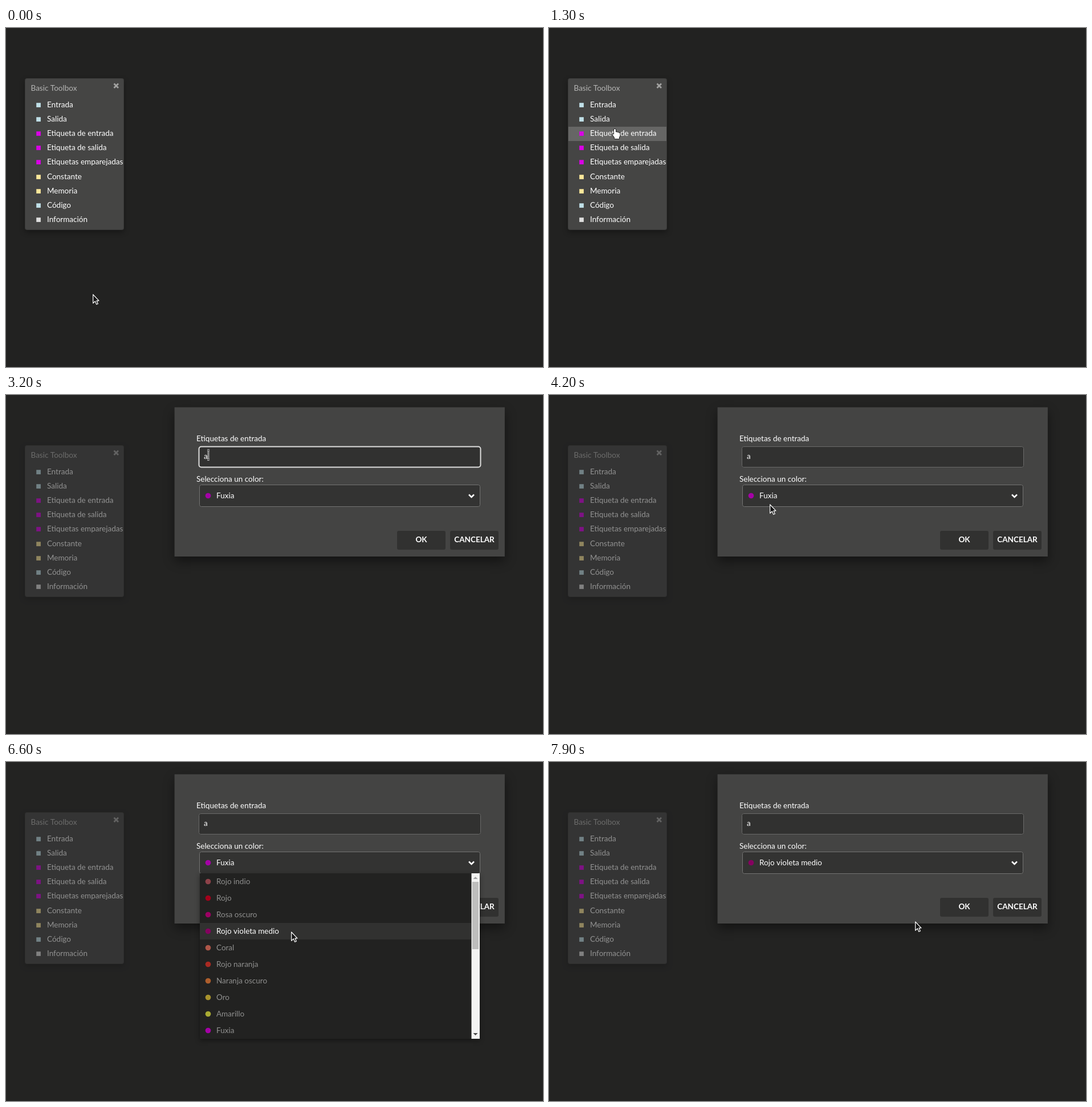
Write an HTML page with a canvas that moves like this. It is 942 by 594 pixels and loops after 8000 ms.

```html
<!DOCTYPE html>
<html lang="es">
<head>
<meta charset="utf-8">
<style>
  html, body { margin: 0; width: 100%; height: 100%; overflow: hidden; background: #222221; }
  canvas { display: block; }
</style>
</head>
<body>
<canvas id="stage" width="942" height="594"></canvas>
<script>
const ctx = document.getElementById('stage').getContext('2d');
const LOOP = 8000, STEP = 100;
const ZOOM = 0.9655; // the interface is laid out at 14px and shown slightly reduced

const BLUE = '#c0e0e8', FUCHSIA = '#da00e6', YELLOW = '#fce79a';
const TOOLS = [
  ['Entrada', BLUE], ['Salida', BLUE],
  ['Etiqueta de entrada', FUCHSIA], ['Etiqueta de salida', FUCHSIA], ['Etiquetas emparejadas', FUCHSIA],
  ['Constante', YELLOW], ['Memoria', YELLOW], ['Código', BLUE], ['Información', '#dddddd'],
];
const COLORS = [
  ['Rojo indio', '#8d4249'], ['Rojo', '#a3001b'], ['Rosa oscuro', '#9c0063'],
  ['Rojo violeta medio', '#850060'], ['Coral', '#ae5648'], ['Rojo naranja', '#a92a22'],
  ['Naranja oscuro', '#ad5e2c'], ['Oro', '#a8932c'], ['Amarillo', '#a9ab33'], ['Fuxia', '#a400a6'],
];

// Pointer path: time, x, y
const PATH = [
  [500, 152, 466], [800, 118, 247], [900, 118, 247], [1300, 116, 177],
  [1900, 116, 177], [2400, 355, 105], [3400, 355, 105], [3900, 393, 162],
  [4000, 393, 162], [4200, 387, 191], [4500, 389, 189], [5000, 389, 189],
  [5100, 401, 217], [5600, 433, 279], [5700, 433, 279], [5800, 417, 295],
  [6000, 417, 295], [6600, 500, 297], [7700, 500, 297], [7900, 642, 279],
];

const ramp = (t, a, b) => Math.min(1, Math.max(0, (t - a) / (b - a)));
const inside = (p, x, y, w, h) => p.x >= x && p.x < x + w && p.y >= y && p.y < y + h;

function pointerAt(t) {
  const i = PATH.findIndex(k => k[0] > t);
  if (i === 0) return { x: PATH[0][1], y: PATH[0][2] };
  if (i < 0) return { x: PATH.at(-1)[1], y: PATH.at(-1)[2] };
  const [t0, x0, y0] = PATH[i - 1], [t1, x1, y1] = PATH[i];
  const u = ramp(t, t0, t1), e = u * u * (3 - 2 * u);
  return { x: Math.round(x0 + (x1 - x0) * e), y: Math.round(y0 + (y1 - y0) * e) };
}

function rect(x, y, w, h, fill, radius = 0) {
  ctx.fillStyle = fill;
  ctx.beginPath();
  ctx.roundRect(x, y, w, h, radius);
  ctx.fill();
}

function outline(x, y, w, h, color, radius, width = 1) {
  ctx.strokeStyle = color;
  ctx.lineWidth = width;
  ctx.beginPath();
  ctx.roundRect(x, y, w, h, radius);
  ctx.stroke();
}

function shadowed(blur, offset, alpha, draw) {
  ctx.save();
  ctx.shadowColor = `rgba(0,0,0,${alpha})`;
  ctx.shadowBlur = blur;
  ctx.shadowOffsetY = offset;
  draw();
  ctx.restore();
}

function text(str, x, y, color = '#fff', weight = 400, align = 'left') {
  ctx.save();
  ctx.translate(x, y);
  ctx.scale(ZOOM, ZOOM);
  ctx.font = `${weight} 14px Lato, sans-serif`;
  ctx.textAlign = align;
  ctx.fillStyle = color;
  ctx.fillText(str, 0, 0);
  ctx.restore();
}

function dot(x, y, color) {
  ctx.fillStyle = color;
  ctx.beginPath();
  ctx.arc(x, y, 5 * ZOOM, 0, 7);
  ctx.fill();
}

function line(points, color, width) {
  ctx.strokeStyle = color;
  ctx.lineWidth = width;
  ctx.stroke(new Path2D(points));
}

function shape(points, fill) {
  ctx.fillStyle = fill;
  ctx.fill(new Path2D(points));
}

function toolbox(hovered) {
  shadowed(10, 4, 0.35, () => rect(33, 88, 174, 266, '#3a3a39', 4));
  rect(34, 89, 172, 264, '#454544', 3);
  text('Basic Toolbox', 43.5, 110, '#b4b4b3');
  line('M189.5 97.5L197 105M197 97.5L189.5 105', '#a2a2a1', 2.8);
  ctx.save();
  ctx.beginPath();
  ctx.rect(34, 89, 172, 264);
  ctx.clip();
  TOOLS.forEach(([name, color], i) => {
    const dy = Math.round(i * 25.12);
    if (i === hovered) rect(34, 123 + dy, 172, 25, '#666665');
    rect(53.2, 131.2 + dy, 8 * ZOOM, 8 * ZOOM, color);
    text(name, 72, 139 + dy);
  });
  ctx.restore();
}

function button(label, x, focused) {
  rect(x, 238, 85, 33, '#313130', 3);
  if (focused) outline(x - 1, 237, 87, 35, '#dededd', 4, 2);
  text(label, x + 42.5, 258, '#fff', 700, 'center');
}

function dialog(t) {
  const typing = t >= 2600 && t < 4100, typed = t >= 3200;
  shadowed(18, 8, 0.45, () => rect(295.6, 21.6, 600 * ZOOM, 261.4, '#444443'));

  text('Etiquetas de entrada', 334, 80.5);
  rect(338, 90, 495, 37, '#313130', 4);
  if (typing) outline(338.5, 90.5, 494, 36, '#dededd', 4, 2);
  else outline(338.5, 90.5, 494, 36, '#6a6a69', 3);
  if (typed) text('a', 347, 112);
  if (typing && t < 3300) rect(typed ? 354 : 347, 101, 1, 14, '#fff');

  text('Selecciona un color:', 334, 151.7);
  rect(339, 157, 493, 39, '#333332', 4);
  outline(339.5, 157.5, 492, 38, '#747473', 3);
  const [name, color] = COLORS[t < 7200 ? 9 : 3];
  dot(354.5, 176.5, color);
  text(name, 369, 181);
  line('M812 174.5L816.5 179L821 174.5', '#fff', 2.5);

  button('OK', 686, t < 2600);
  button('CANCELAR', 779, false);
}

function colorList(hovered) {
  shadowed(8, 3, 0.4, () => rect(340, 195, 491, 290, '#222221'));
  COLORS.forEach(([name, color], i) => {
    const y = 195 + 29 * i;
    if (i === hovered) rect(340, y, 476, 29, '#313130');
    dot(354.5, y + 14.5, color);
    text(name, 369, y + 19, i === hovered ? '#fff' : '#8f8f8e');
  });
  rect(816.5, 195, 15 * ZOOM, 290, '#f3f3f2');
  rect(818, 210, 11, 118, '#bebebd');
  shape('M819.5 205L823.5 201L827.5 205Z', '#a0a0a0');
  shape('M819.5 475L823.5 479L827.5 475Z', '#444');
}

const CURSORS = {
  arrow() {
    const p = new Path2D('M.7 1V16.2L4.4 12.8L6.7 18.3L9.3 17.2L7 11.8H11Z');
    ctx.fillStyle = '#151515';
    ctx.fill(p);
    ctx.strokeStyle = '#fff';
    ctx.lineWidth = 1.2;
    ctx.stroke(p);
  },
  hand() {
    const p = new Path2D('M-2 .8Q-.5-.8 1 .8V5.5Q2.5 4.5 3.5 6Q5 5 6 6.5Q8.5 6 8.5 8.5V12L7 14.5V17H-1V15L-4.6 9.8Q-4.8 8-2 9.5Z');
    ctx.strokeStyle = '#111';
    ctx.lineWidth = 1.6;
    ctx.stroke(p);
    ctx.fillStyle = '#fff';
    ctx.fill(p);
  },
  beam() {
    const p = 'M-2-8.5H2M0-8.5V8.5M-2 8.5H2';
    line(p, '#fff', 2.6);
    line(p, '#111', 1);
  },
};

function cursor(kind, { x, y }) {
  ctx.save();
  ctx.translate(x, y);
  ctx.lineJoin = 'round';
  CURSORS[kind]();
  ctx.restore();
}

function draw(t) {
  const p = pointerAt(t);
  const shown = ramp(t, 1550, 1780);
  const listAlpha = ramp(t, 4250, 4500) * (1 - ramp(t, 7130, 7400));
  const overTools = inside(p, 34, 123, 172, 226) && t < 2000;

  ctx.globalAlpha = 1;
  rect(0, 0, 942, 594, '#222221');
  toolbox(overTools && !shown ? Math.floor((p.y - 122.8) / 25.12) : -1);
  if (shown) {
    ctx.globalAlpha = shown;
    rect(0, 0, 942, 594, 'rgba(37,37,36,.5)');
    dialog(t);
  }
  if (listAlpha) {
    ctx.globalAlpha = listAlpha;
    colorList(p.y > 196 ? Math.floor((p.y + 3 - 195) / 29) : -1);
  }
  ctx.globalAlpha = 1;
  const overInput = shown && inside(p, 338, 90, 495, 37);
  cursor(overTools ? 'hand' : overInput ? 'beam' : 'arrow', p);
}

// The screen is refreshed ten times a second
const start = performance.now();
function tick() {
  const t = (performance.now() - start) % LOOP;
  draw(Math.floor(t / STEP) * STEP);
  requestAnimationFrame(tick);
}
tick();
</script>
</body>
</html>
```
